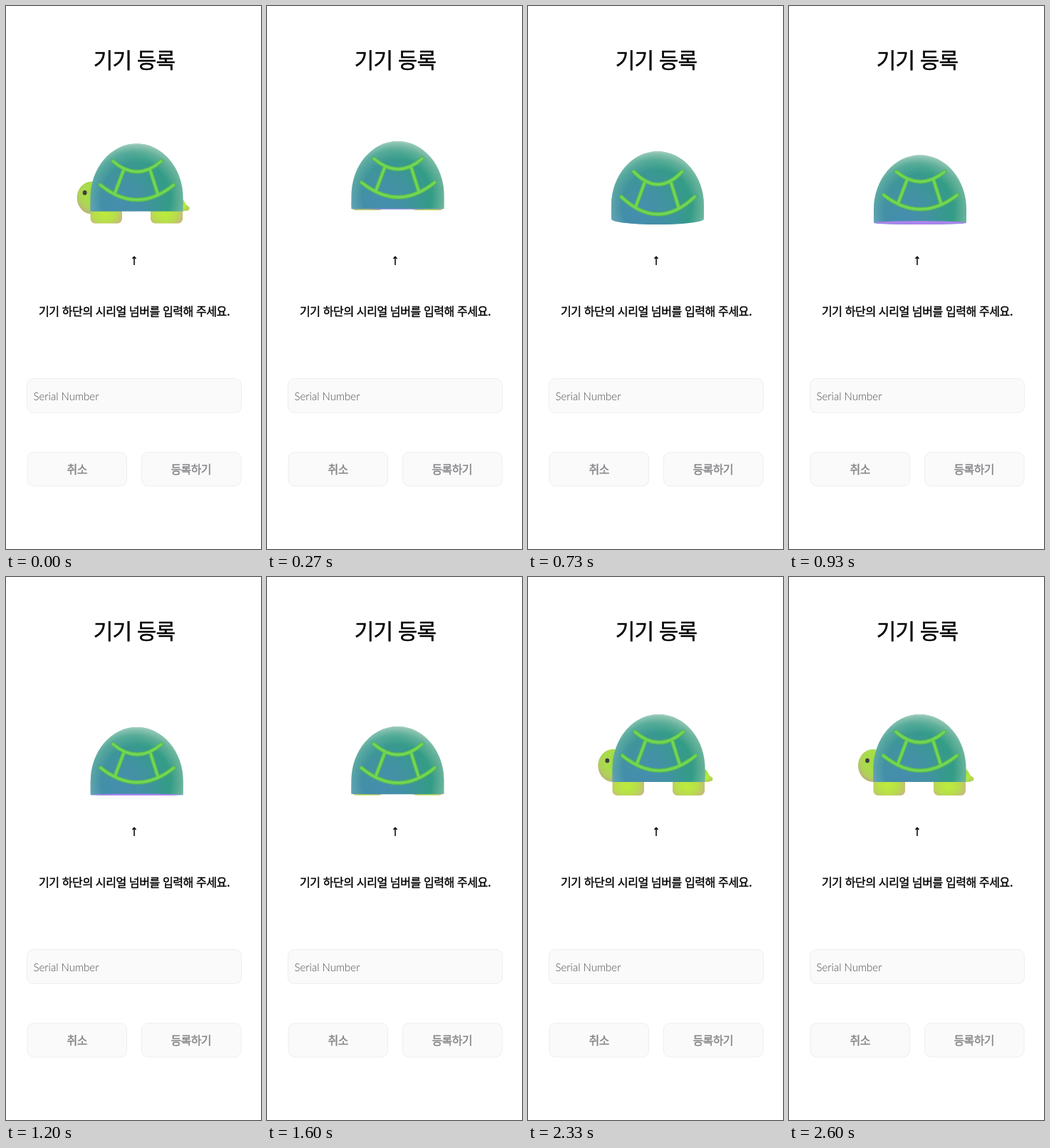
These frames come from a looping animation (358 by 763 pixels, 2670 ms). An HTML page:

```html
<!DOCTYPE html>
<html lang="ko">
<head>
<meta charset="utf-8">
<title>기기 등록</title>
<style>
  html, body { margin: 0; width: 100%; height: 100%; overflow: hidden; background: #fff; }
  svg { display: block; width: 100%; height: 100%; }
  text { font-family: 'Noto Sans CJK KR', 'Noto Sans CJK', sans-serif; text-anchor: middle; stroke: #000; stroke-width: .4px; }
  .title { font-size: 30px; letter-spacing: -0.9px; }
  .guide { font-size: 16px; letter-spacing: -0.4px; }
  .hint { font: 300 15px Lato, sans-serif; fill: #4c4c4c; stroke: none; text-anchor: start; }
  .label { font-size: 16px; letter-spacing: -0.6px; fill: #858589; stroke: #858589; }
  .box { fill: #fafafa; stroke: #eee; }
  .mark { fill: none; stroke-linecap: round; }
</style>
</head>
<body>
<svg viewBox="0 0 358 763">
  <defs>
    <radialGradient id="body" gradientUnits="userSpaceOnUse" cx="162" cy="80" r="84">
      <stop offset="0" stop-color="#478fae"/>
      <stop offset=".4" stop-color="#4193a0"/>
      <stop offset=".8" stop-color="#339c86"/>
      <stop offset="1" stop-color="#48a488"/>
    </radialGradient>
    <radialGradient id="rim" gradientUnits="userSpaceOnUse" cx="183" cy="76" r="77">
      <stop offset=".64" stop-color="#cfe3da" stop-opacity="0"/>
      <stop offset=".84" stop-color="#cfe3da" stop-opacity=".22"/>
      <stop offset=".95" stop-color="#cfe3da" stop-opacity=".5"/>
      <stop offset="1" stop-color="#cfe3da" stop-opacity=".8"/>
    </radialGradient>
    <linearGradient id="low" gradientUnits="userSpaceOnUse" x1="168" y1="74" x2="160" y2="104">
      <stop offset="0" stop-color="#4388b4" stop-opacity="0"/>
      <stop offset="1" stop-color="#4388b4" stop-opacity=".5"/>
    </linearGradient>
    <radialGradient id="skin" cx=".58" cy=".36" r=".66">
      <stop offset="0" stop-color="#9edb3f"/>
      <stop offset=".5" stop-color="#a8dd48"/>
      <stop offset=".8" stop-color="#b0cf5c"/>
      <stop offset="1" stop-color="#b9b276"/>
    </radialGradient>
    <radialGradient id="leg" cx=".45" cy=".6" r=".62">
      <stop offset="0" stop-color="#bdec3c"/>
      <stop offset=".55" stop-color="#b7de4a"/>
      <stop offset="1" stop-color="#c8b681"/>
    </radialGradient>
    <linearGradient id="tailSkin" x2="1" y2="1">
      <stop offset="0" stop-color="#8fc83a"/>
      <stop offset=".6" stop-color="#b6ec3e"/>
      <stop offset="1" stop-color="#b5c060"/>
    </linearGradient>
  </defs>

  <text class="title" x="180" y="87">기기 등록</text>

  <g id="turtle">
    <path id="tail" d="M240 76Q249 75 252 81Q254 86 258 88Q261 91 258 93.500Q254 95.500 240 95Z" fill="url(#tailSkin)"/>
    <g id="head">
      <ellipse cx="21" cy="72" rx="21" ry="23" fill="url(#skin)"/>
      <ellipse id="eye" cy="65" rx="2.900" ry="3.300" fill="#443a42"/>
    </g>
    <g id="legs" fill="url(#leg)">
      <rect x="118.500" y="80" width="44.500" rx="6.500"/>
      <rect x="203" y="80" width="45" rx="6.500"/>
    </g>
    <g id="shell">
      <path class="dome" fill="url(#body)"/>
      <path class="dome" fill="url(#low)"/>
      <path class="dome" fill="url(#rim)"/>
      <ellipse id="under" cx="183.500" cy="95" rx="65" fill="#a984ee"/>
      <path class="mark" stroke="#4fae5c" stroke-width="6"/>
      <path class="mark" stroke="#66cd50" stroke-width="4.500"/>
      <path class="mark" stroke="#7bdb56" stroke-width="1.500"/>
    </g>
  </g>

  <path d="M180 364V352.500M177.500 355L180 352.300L182.500 355" fill="none" stroke="#000" stroke-width="1.500"/>
  <text class="guide" x="180" y="434.500">기기 하단의 시리얼 넘버를 입력해 주세요.</text>

  <rect class="box" x="29.500" y="523.500" width="301" height="48" rx="9"/>
  <text class="hint" x="38.500" y="553.500">Serial Number</text>
  <rect class="box" x="30" y="627" width="139.500" height="47.500" rx="9"/>
  <text class="label" x="99.700" y="657">취소</text>
  <rect class="box" x="190.500" y="627" width="139.500" height="47.500" rx="9"/>
  <text class="label" x="259.700" y="657">등록하기</text>
</svg>

<script>
const LOOP = 2670, FPS = 15, STEPS = 40;
const GROUND = 212, LEG = 19, LAND = 10;

const $ = id => document.getElementById(id);
const all = sel => document.querySelectorAll(sel);
const set = (el, name, value) => el.setAttribute(name, value);
const move = (id, x, y) => set($(id), 'transform', `translate(${x} ${y})`);
const show = (id, on) => set($(id), 'visibility', on ? 'visible' : 'hidden');

const part = (s, from, to) => Math.min(1, Math.max(0, (s - from) / (to - from)));
const ramp = (s, from, to) => { const p = part(s, from, to); return p * p * (3 - 2 * p); };
const easeOut = (s, from, to) => 1 - (1 - part(s, from, to)) ** 2;

// leans back in the air, swings forward to land, then rocks out
function rock(s) {
  if (s < LAND) return 13.5 * ramp(s, 7, LAND) - 2.5 * ramp(s, 3, 7);
  return 11 * Math.exp(-0.2 * (s - LAND)) * Math.cos((s - LAND) * Math.PI / 6);
}

function pose(s) {
  const out = 1 - ramp(s, 0, 5) + easeOut(s, 23.8, 28);
  const stretch = 1 - ramp(s, 0, 5) + ramp(s, 30, 38);
  const leg = LEG * out;
  const tilt = rock(s) * (1 - out);
  const hop = 190 + 0.5 * (s - 3.6) ** 2;
  return {
    out, leg, tilt,
    top: Math.min(hop, GROUND - leg - Math.abs(tilt)),
    headX: 122 - 21 * out - 4 * stretch,
    nod: 4 * (1 - ramp(s, 1, 5))
  };
}

const arc = (x1, x2, end, mid) => `M${x1} ${end}Q${(x1 + x2) / 2} ${2 * mid - end} ${x2} ${end}`;

function draw(s) {
  const { out, leg, tilt, top, headX, nod } = pose(s);
  move('turtle', 0, top);

  move('head', headX, nod);
  set($('eye'), 'cx', 13 - nod / 2);
  move('tail', 17 * (out - 1), 0);
  for (const r of all('#legs rect')) set(r, 'height', 15 + leg);
  show('head', headX < 120);
  show('legs', leg > 0.5);

  move('shell', -0.2 * tilt, 0);
  const dome = `M118.500 95V76A65 76 0 0 1 248.500 76V95A65 ${Math.abs(tilt) + 0.01} 0 0 1 118.500 95Z`;
  for (const d of all('.dome')) set(d, 'd', dome);
  set($('under'), 'ry', Math.max(0, -tilt));

  const upEnd = 24.5 + tilt * 0.5, upMid = 39.5 + tilt * 0.9;
  const lowEnd = 58 + tilt * 0.75, lowMid = 79 + tilt * 1.2;
  const y1 = upMid - 2, y2 = lowEnd + (lowMid - lowEnd) * 0.6;
  const marks = arc(150, 218, upEnd, upMid) + arc(132.5, 235.5, lowEnd, lowMid) +
    `M165 ${y1}L152.500 ${y2}M202.500 ${y1}L213 ${y2}`;
  for (const m of all('.mark')) set(m, 'd', marks);
}

// the small lead lands each step on its 10 ms mark; the first pose is held twice
function tick() {
  const t = performance.now() % LOOP;
  const step = Math.floor((t + 4) * FPS / 1000);
  draw(Math.min(STEPS - 1, Math.max(1, step)));
  requestAnimationFrame(tick);
}
tick();
</script>
</body>
</html>
```
